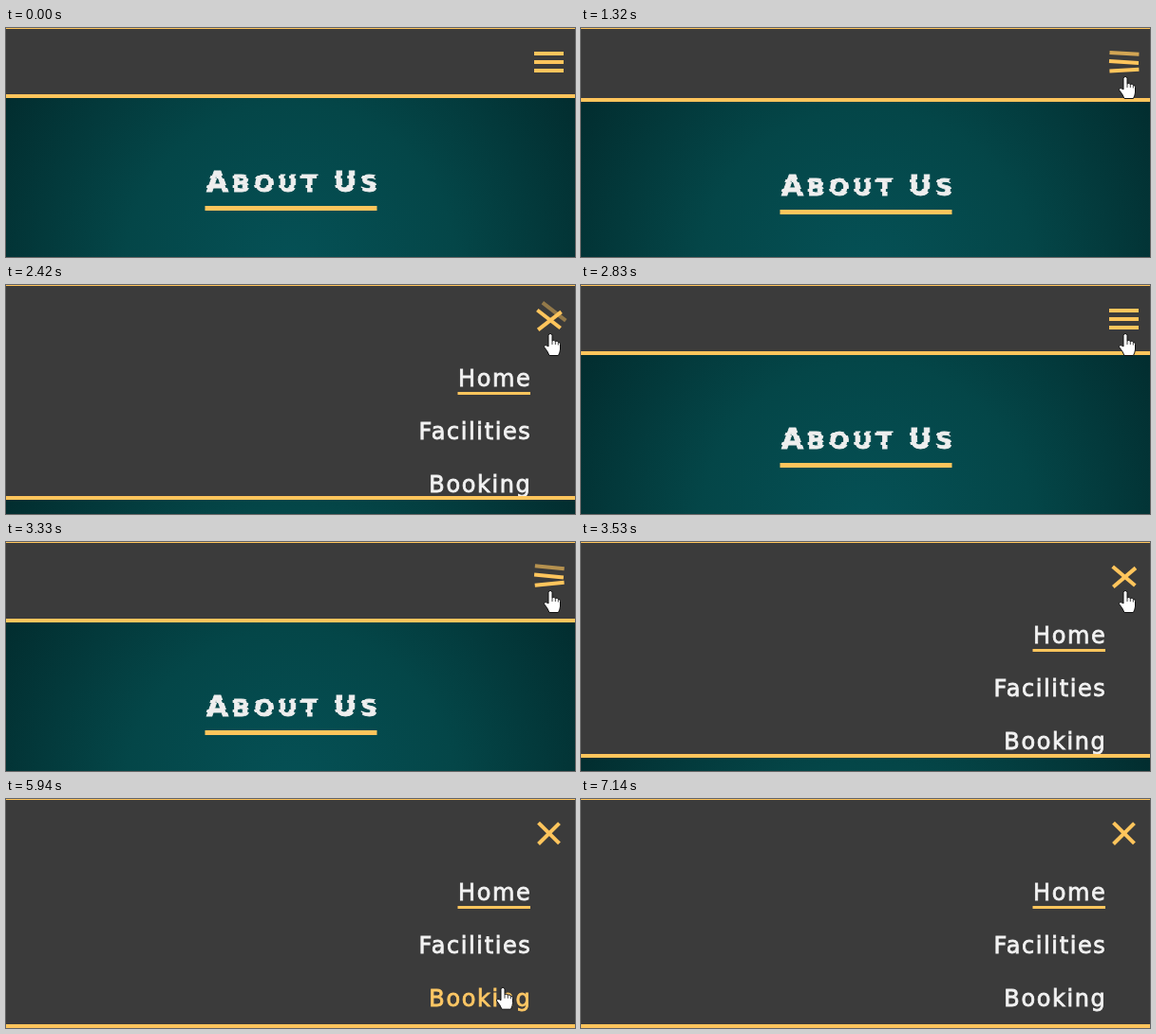
These frames come from a looping animation (599 by 242 pixels, 7340 ms). An HTML page:

```html
<!DOCTYPE html>
<html lang="en">
<head>
<meta charset="utf-8">
<title>Collapsing menu</title>
<style>
  html, body { margin: 0; width: 100%; height: 100%; overflow: hidden; background: #3b3b3b; }
  svg { display: block; width: 599px; height: 242px; }
  .menu text { font: 24px "DejaVu Sans", sans-serif; letter-spacing: 1.6px; text-anchor: end; stroke-width: .8px; }
  .title { font: bold 25px "DejaVu Sans", sans-serif; letter-spacing: 4.1px; fill: #eee; stroke: #eee; stroke-width: .8px; }
  .title .cap { font-size: 30px; }
  .gold { fill: #ffc55c; }
</style>
</head>
<body>
<svg viewBox="0 0 599 242">
  <defs>
    <radialGradient id="teal" gradientUnits="userSpaceOnUse" cx="300" cy="256" r="350">
      <stop offset="0" stop-color="#055156"/>
      <stop offset=".5" stop-color="#044648"/>
      <stop offset="1" stop-color="#022d2f"/>
    </radialGradient>
    <clipPath id="headerClip"><rect id="headerArea" width="599" height="70"/></clipPath>
    <clipPath id="sliceA"><path d="M200 140H400V156H200ZM200 159H400V166H200ZM200 169H400V180H200Z"/></clipPath>
    <clipPath id="sliceB"><path d="M200 156H400V159H200ZM200 166H400V169H200Z"/></clipPath>
  </defs>

  <g id="page">
    <rect y="70" width="599" height="400" fill="url(#teal)"/>
    <g clip-path="url(#sliceA)">
      <text id="title" class="title" x="211" y="173"><tspan class="cap">A</tspan>BOUT <tspan class="cap">U</tspan>S</text>
    </g>
    <g clip-path="url(#sliceB)"><use href="#title" x="-1.5"/></g>
    <rect class="gold" x="209.5" y="188" width="181" height="5"/>
  </g>

  <g clip-path="url(#headerClip)">
    <rect width="599" height="242" fill="#3b3b3b"/>
    <g class="menu">
      <text x="553.4" y="107">Home</text>
      <text x="553.4" y="163">Facilities</text>
      <text x="553.4" y="219">Booking</text>
      <rect class="gold" x="475.5" y="113" width="76.5" height="3"/>
    </g>
  </g>
  <rect class="gold" width="599" height="1"/>
  <rect id="border" class="gold" width="599" height="4"/>

  <g class="gold">
    <rect class="bar" x="-15.5" y="-2" width="31" height="4"/>
    <rect class="bar" x="-15.5" y="-2" width="31" height="4"/>
    <rect class="bar" x="-15.5" y="-2" width="31" height="4"/>
  </g>

  <g id="cursor" stroke="#111" stroke-linejoin="round">
    <path fill="#fff" d="M-2 2.5Q-2 .5 0 .5T2 2.5V8Q4 6.5 5.3 8.5Q7.3 7.3 8.3 9.5Q10.5 9 10.5 11.5V17Q10.3 20 8.5 23.5H-1Q-3 18.5-6.5 14.5Q-6.3 11-2 14Z"/>
    <path fill="none" stroke-width=".8" d="M2 8V12M5.3 8.5V12M8.3 9.5V12.5"/>
  </g>
</svg>
<script>
const LOOP = 7340;
// Bursts of picture changes: first change, last change, number of changes
const bursts = [[300, 910, 7], [1220, 1720, 6], [2320, 2830, 6], [3230, 3730, 6],
                [3930, 4330, 5], [4830, 5230, 5], [5740, 6040, 4], [6640, 7140, 6]];
const toggles = [1286, 2366, 3283];
const cursorPath = [[210, 568, 250], [600, 569, 110], [910, 573, 51],
                    [3840, 573, 51], [4330, 523, 113], [4740, 523, 113], [4830, 523, 133],
                    [5230, 523, 163], [5650, 523, 163], [6040, 523, 211],
                    [6550, 523, 211], [6950, 523, 246]];
const hovers = [[4080, 4850], [4880, 5740], [5800, 6800]];

const $ = s => document.querySelector(s);
const bars = document.querySelectorAll('.bar');
const links = document.querySelectorAll('.menu text');
const clamp = v => Math.min(1, Math.max(0, v));
const mix = (a, b, k) => a + (b - a) * k;

// cubic-bezier(.25, .1, .25, 1)
function ease(x) {
  x = clamp(x);
  if (x === 0 || x === 1) return x;
  let lo = 0, hi = 1, u = .5;
  for (let i = 0; i < 20; i++) {
    u = (lo + hi) / 2;
    const bx = .75 * u * (1 - u) + u ** 3;
    if (bx < x) lo = u; else hi = u;
  }
  return .3 * u * (1 - u) ** 2 + 3 * u * u * (1 - u) + u ** 3;
}

function heldTime(t) {
  let held = 0;
  for (const [first, last, count] of bursts) {
    const gap = (last - first) / (count - 1);
    for (let i = 0; i < count; i++) {
      const at = Math.floor((first + i * gap) / 10 + 1e-6) * 10;
      if (at <= t) held = at;
    }
  }
  return held;
}

function openness(t, duration, delay = 0) {
  let value = 0;
  toggles.forEach((start, i) => {
    if (t < start + delay) return;
    const k = ease((t - start - delay) / duration);
    value = i % 2 ? 1 - k : k;
  });
  return value;
}

function cursorAt(t) {
  let i = cursorPath.findIndex(key => key[0] > t);
  if (i < 0) return cursorPath.at(-1).slice(1);
  if (i === 0) return cursorPath[0].slice(1);
  const [t0, x0, y0] = cursorPath[i - 1], [t1, x1, y1] = cursorPath[i];
  const k = (t - t0) / (t1 - t0);
  return [mix(x0, x1, k), mix(y0, y1, k)];
}

// The bar slides by (dx, dy) along its own turned axes
function placeBar(bar, y, angle, dx, dy) {
  bar.setAttribute('transform', `translate(571.5 ${y}) rotate(${angle}) translate(${dx} ${dy})`);
}

function draw(time) {
  const t = heldTime(time % LOOP);

  const shift = Math.round(168 * openness(t, 350, 20));
  $('#page').setAttribute('transform', `translate(0 ${shift})`);
  $('#headerArea').setAttribute('height', 70 + shift);
  $('#border').setAttribute('y', 70 + shift);

  const turn = openness(t, 400);
  placeBar(bars[0], 27, 45 * turn, 6 * turn, -3 * turn);
  placeBar(bars[1], 36, 45 * turn, 0, 0);
  placeBar(bars[2], 45, -45 * turn, 6 * turn, -6 * turn);
  bars[0].setAttribute('opacity', 1 - openness(t, 200));

  hovers.forEach(([on, off], i) => {
    const k = ease((t - on) / 200) - ease((t - off) / 200);
    const color = `rgb(${mix(242, 255, k)},${mix(242, 197, k)},${mix(242, 92, k)})`;
    links[i].style.fill = links[i].style.stroke = color;
  });

  const [x, y] = cursorAt(t);
  $('#cursor').setAttribute('transform', `translate(${x} ${y})`);
}

const start = performance.now();
function tick() {
  draw(performance.now() - start);
  requestAnimationFrame(tick);
}
tick();
</script>
</body>
</html>
```
